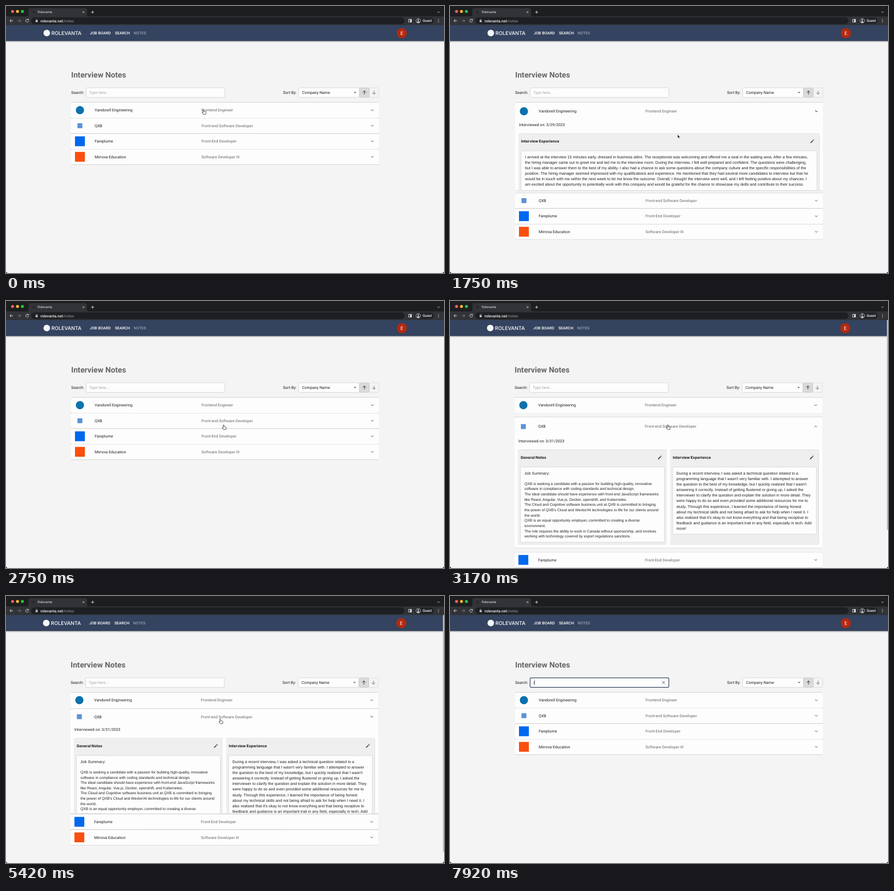
Animation, 800 px wide and 489 px high, one loop 8 s. Source, as an HTML page:

```html
<!DOCTYPE html>
<html lang="en">
<head>
<meta charset="utf-8">
<title>Interview Notes</title>
<style>
  html, body { margin: 0; width: 100%; height: 100%; overflow: hidden; background: #000; }
  #stage { display: block; width: 100vw; height: 100vh; }
  text { font-family: Roboto, sans-serif; white-space: pre; text-rendering: geometricPrecision; }
  .body { font-family: "Liberation Sans", Arial, sans-serif; }
  .title { font-family: Inter, sans-serif; font-weight: 700; }
  .brand { font-family: Inter, sans-serif; }
  .nav { filter: drop-shadow(0 1px 1.3px #0007); }
  .paper { filter: drop-shadow(0 .8px .4px #0009); }
  .card { filter: drop-shadow(0 .6px .5px #0006); }
  .box { filter: drop-shadow(0 .5px .8px #0003); }
  .line { fill: none; stroke-width: .9; }
</style>
</head>
<body>
<svg id="stage" viewBox="0 0 800 489" preserveAspectRatio="none"></svg>
<script>
const LOOP = 8000;
const BASE = 7.14;
const ROW = 28.5, LIST_TOP = 176.5;
const PAGE_TOP = 35;
const INK = '#1f1f1f', GREY = '#666', NAVY = '#34435f';

// Text is placed by the vertical middle of its capitals.
const text = (x, mid, str, { size = BASE, fill = INK, weight = 400, cls = '', anchor = 'start' } = {}) =>
  `<text x="${x}" y="${mid + size * .356}" font-size="${size}" fill="${fill}" font-weight="${weight}" class="${cls}" text-anchor="${anchor}">${str}</text>`;
const rect = (x, y, w, h, fill, extra = '') =>
  `<rect x="${x}" y="${y}" width="${w}" height="${h}" fill="${fill}" ${extra}/>`;
const circle = (x, y, r, fill, extra = '') => `<circle cx="${x}" cy="${y}" r="${r}" fill="${fill}" ${extra}/>`;
const line = (d, stroke, extra = '') => `<path class="line" d="${d}" stroke="${stroke}" ${extra}/>`;
const square = (side, fill) => rect(135 - side / 2, 14.25 - side / 2, side, side, fill);
const cross = (x, y, r, stroke) =>
  line(`M${x - r} ${y - r}l${2 * r} ${2 * r}m0 ${-2 * r}l${-2 * r} ${2 * r}`, stroke);

const experienceA = `I arrived at the interview 15 minutes early, dressed in business attire. The receptionist was welcoming and offered me a seat in the waiting area. After a few minutes,
the hiring manager came out to greet me and led me to the interview room. During the interview, I felt well-prepared and confident. The questions were challenging,
but I was able to answer them to the best of my ability. I also had a chance to ask some questions about the company culture and the specific responsibilities of the
position. The hiring manager seemed impressed with my qualifications and experience. He mentioned that they had several more candidates to interview but that he
would be in touch with me within the next week to let me know the outcome. Overall, I thought the interview went well, and I left feeling positive about my chances. I
am excited about the opportunity to potentially work with this company and would be grateful for the chance to showcase my skills and contribute to their success.`;

const notesB = `QXB is seeking a candidate with a passion for building high-quality, innovative
software in compliance with coding standards and technical design.
The ideal candidate should have experience with front-end JavaScript frameworks
like React, Angular, Vue.js, Docker, openshift, and Kubernetes.
The Cloud and Cognitive software business unit at QXB is committed to bringing
the power of QXB's Cloud and Wexlor/AI technologies to life for our clients around
the world.
QXB is an equal opportunity employer, committed to creating a diverse
environment.
The role requires the ability to work in Canada without sponsorship, and involves
working with technology covered by export regulations sanctions.`;

const experienceB = `During a recent interview, I was asked a technical question related to a
programming language that I wasn't very familiar with. I attempted to answer
the question to the best of my knowledge, but I quickly realized that I wasn't
answering it correctly. Instead of getting flustered or giving up, I asked the
interviewer to clarify the question and explain the solution in more detail. They
were happy to do so and even provided some additional resources for me to
study. Through this experience, I learned the importance of being honest
about my technical skills and not being afraid to ask for help when I need it. I
also realized that it's okay to not know everything and that being receptive to
feedback and guidance is an important trait in any field, especially in tech. Add
more!`;

const paragraph = (x, mid, str, size, pitch) => str.split('\n')
  .map((s, i) => text(x, mid + i * pitch, s, { size, cls: 'body' })).join('');

function card(x, width, bottom, boxBottom, title, content) {
  const pencil = `<path transform="translate(${x + width - 13} 39)" fill="#555" d="M-3.2 3.2v-1.4l4-4 1.4 1.4-4 4zM1.3-2.7l.8-.8q.4-.3.8 0l.6.6q.3.4 0 .8l-.8.8z"/>`;
  return rect(x, 24.8, width, bottom - 24.8, '#efefef', 'rx="2" class="card"') +
    text(x + 5, 38.8, title, { size: 6.75, cls: 'title', fill: '#111' }) + pencil +
    rect(x + 5.2, 56.8, width - 10, boxBottom - 56.8, '#fdfdfd', 'rx="1.8" class="box"') + content;
}

const rows = [
  { company: 'Vandorell Engineering', role: 'Frontend Engineer', logo: circle(135, 14.25, 7.5, '#0c71ad'),
    open: 422, close: 1701, duration: 315, height: 140, date: '3/29/2023',
    content: card(125, 549.5, 132.9, 128.5, 'Interview Experience', paragraph(137, 67.3, experienceA, BASE, 10.15)) },
  { company: 'QXB', role: 'Front-end Software Developer', logo: square(9, '#5a92d4'),
    open: 2800, close: 5338, duration: 349, height: 205, date: '3/31/2023',
    content: card(125, 272, 198, 193.3, 'General Notes',
        text(137, 67.3, 'Job Summary:', { cls: 'body' }) + paragraph(137, 86.7, notesB, 6.75, 9.63)) +
      card(403, 271.5, 198, 178.8, 'Interview Experience', paragraph(414.5, 67.3, experienceB, BASE, 10.15)) },
  { company: 'Fareplume', role: 'Front-End Developer', logo: square(18, '#0068ef') },
  { company: 'Mirrova Education', role: 'Software Developer III', logo: square(18, '#fa4f0f') },
];

const rowMarkup = (r, i) => `<g class="row">
  ${rect(119, 0, 562, ROW, '#fdfdfd', 'class="paper" rx="1.5"')}
  ${i ? rect(119, 0, 562, .6, '#d9d9d9') : ''}
  <svg class="content" width="800" height="0" overflow="hidden">
    ${r.content ? text(126, 8.8, 'Interviewed on: ' + r.date) + r.content : ''}</svg>
  <g class="head">${r.logo}${text(162, 14.2, r.company)}${text(357, 14.2, r.role, { fill: GREY })}
    <path class="line chevron" d="M-2.3-1.2L0 1.2 2.3-1.2" stroke="#444"/></g></g>`;

const chrome =
  rect(0, 0, 800, PAGE_TOP, '#1d1e20', 'rx="4"') +
  `<path fill="#323337" d="M0 ${PAGE_TOP}V19H38q3 0 3-3V7q0-3 3-3H145q3 0 3 3v9q0 3 3 3H800V${PAGE_TOP}z"/>` +
  circle(12, 10, 2.7, '#ff5f57') + circle(21, 10, 2.7, '#febc2e') + circle(30, 10, 2.7, '#28c840') +
  circle(50.5, 11.3, 2.4, '#26272b') + text(58, 11.3, 'Rolevanta', { size: 6, fill: '#e4e5e8' }) +
  cross(141.5, 11.3, 1.6, '#d5d6d9') + line('M155.5 11.3h5.4m-2.7-2.7v5.4', '#e4e5e8') +
  line('M788 10.3l2 2 2-2', '#d5d6d9') +
  rect(46, 20.8, 682, 12.4, '#1e1f22', 'rx="6.2"') +
  line('M12.8 27H7m2.6-2.6L7 27l2.6 2.6', '#e4e5e8') +
  line('M21.3 27h5.8m-2.6-2.6l2.6 2.6-2.6 2.6', '#85868a') +
  line('M41 25.4a2.7 2.7 0 1 0 .3 2.2M41.2 23.8v2h-2', '#e4e5e8') +
  rect(54, 26.2, 4, 3.4, '#c9cacd', 'rx=".5"') + line('M54.9 26.3v-1a1.1 1.1 0 0 1 2.2 0v1', '#c9cacd', 'style="stroke-width:.7"') +
  `<text x="63" y="29.5" font-size="7" font-weight="500" fill="#f1f2f4">rolevanta.net<tspan fill="#999b9f" font-weight="400">/notes</tspan></text>` +
  rect(735.6, 24.4, 5, 5, 'none', 'stroke="#e4e5e8" stroke-width=".9"') + rect(738.2, 24.4, 2.6, 5, '#e4e5e8') +
  rect(746.5, 21, 35, 12, '#222327', 'rx="6"') +
  circle(753, 27, 4.2, 'none', 'stroke="#e4e5e8" stroke-width=".8"') +
  circle(753, 25.8, 1.3, '#e4e5e8') + `<path fill="#e4e5e8" d="M750.2 29.3q2.8-2.4 5.6 0-2.8 2.6-5.6 0z"/>` +
  text(761, 27.1, 'Guest', { size: 6.4, fill: '#f1f2f4', weight: 500 }) +
  [24.6, 27, 29.4].map(y => circle(790, y, .65, '#e4e5e8')).join('');

const navbar = rect(0, PAGE_TOP, 800, 29, NAVY, 'class="nav"');

const navItems =
  circle(74.5, 49.6, 6, '#f4f5f7') +
  text(83, 49.7, 'ROLEVANTA', { size: 9.2, fill: '#fff', weight: 500, cls: 'brand' }) +
  text(153, 49.7, 'JOB BOARD', { fill: '#fff', weight: 500 }) +
  text(199, 49.7, 'SEARCH', { fill: '#fff', weight: 500 }) +
  text(233.3, 49.7, 'NOTES', { fill: '#b3b9c5' }) +
  circle(723, 49.7, 9.2, '#b5290f') + text(723, 49.8, 'E', { size: 8.9, fill: '#fff', anchor: 'middle' });

const toolbar =
  text(119, 126.4, 'Interview Notes', { size: 14.2, fill: '#666', weight: 700 }) +
  text(119, 158.6, 'Search:') +
  rect(146.3, 149.8, 253.4, 17.6, '#fdfdfd', 'id="field" rx="1.8"') +
  `<g id="hint">${text(152, 158.6, 'Type here...', { fill: '#a6a6a6' })}</g>` +
  `<g id="typed">${text(152.3, 158.6, 'i')}${cross(390, 158.5, 2.6, '#444')}</g>` +
  rect(0, 154.4, .6, 8.4, '#111', 'id="caret"') +
  text(506, 158.6, 'Sort By:') +
  rect(534.5, 149.8, 111, 17.6, '#fdfdfd', 'rx="1.8" stroke="#c2c2c2" stroke-width=".6"') +
  text(540.8, 158.6, 'Company Name') + `<path fill="#555" d="M635.3 157.4h4.6l-2.3 2.4z"/>` +
  rect(663.5, 149.8, 17.4, 17.6, '#f4f4f4', 'rx="1.8" stroke="#cfcfcf" stroke-width=".6"') +
  rect(645.8, 149.8, 17.7, 17.6, '#dadada', 'rx="1.8" stroke="#c2c2c2" stroke-width=".6"') +
  line('M654.7 162v-6.6m-3.1 3.1l3.1-3.1 3.1 3.1', '#222') +
  line('M672.2 155.2v6.6m-3.1-3.1l3.1 3.1 3.1-3.1', '#666');

const cursors = {
  hand: '<path fill="#fff" stroke="#111" stroke-width=".7" stroke-linejoin="round" d="M-.9.3q.8-1.1 1.6 0l.2 2.7 2.8.6q1.3.4 1.1 1.8l-.7 3h-4.1l-2.2-2.7q-.6-1.2.6-1l.9.7z"/>',
  arrow: '<path fill="#111" stroke="#fff" stroke-width=".5" d="M0 0v6.3l1.4-1.3 1 2.2 1.1-.5-1-2.1h2z"/>',
  beam: line('M-1.3-3.7q1.3 0 1.3 1v5.4q0 1-1.3 1M1.3-3.7q-1.3 0-1.3 1v5.4q0 1 1.3 1', '#222', 'style="stroke-width:.7"'),
};

const stage = document.getElementById('stage');
stage.innerHTML = rect(0, 30, 800, 459, '#f4f4f4', 'rx="4"') + navbar +
  `<g id="page">${navItems}${toolbar}${rows.map(rowMarkup).join('')}</g>` +
  `<g id="scroll">${rect(798, PAGE_TOP, 2, 450, '#fafafa')}${rect(798, PAGE_TOP, 2, 0, '#bdbdbd', 'id="thumb" rx="1"')}</g>` + chrome +
  `<g id="mouse">${Object.entries(cursors).map(([k, v]) => `<g id="${k}">${v}</g>`).join('')}</g>`;

const $ = id => document.getElementById(id);
const show = (id, on) => $(id).setAttribute('visibility', on ? 'visible' : 'hidden');
const move = (el, x, y, turn = 0) => el.setAttribute('transform', `translate(${x} ${y}) rotate(${turn})`);
const rowParts = [...stage.querySelectorAll('.row')].map(g => ({
  g, paper: g.querySelector('.paper'), head: g.querySelector('.head'),
  content: g.querySelector('.content'), chevron: g.querySelector('.chevron'),
}));

// cubic-bezier(.4, 0, .2, 1), solved by bisection
function ease(x) {
  if (x <= 0) return 0;
  if (x >= 1) return 1;
  let lo = 0, hi = 1, s;
  for (let i = 0; i < 24; i++) {
    s = (lo + hi) / 2;
    const at = 1.2 * (1 - s) ** 2 * s + .6 * (1 - s) * s * s + s ** 3;
    if (at < x) lo = s; else hi = s;
  }
  return s * s * (3 - 2 * s);
}

const openness = (row, t, duration) => !row.open ? 0 :
  t < row.close ? ease((t - row.open) / duration) : 1 - ease((t - row.close) / duration);

// time, x, y of the pointer's hot spot
const path = [
  [0, 360.5, 190], [1640, 360.5, 190], [1750, 415.8, 235.5], [2000, 417, 239], [2500, 397.5, 227],
  [3900, 397.5, 227], [3920, 391.5, 225.5], [5750, 391.5, 225.5], [6900, 230, 158.5], [LOOP, 230, 158.5],
];
function pointer(t) {
  const i = path.findIndex(p => p[0] > t);
  const [t0, x0, y0] = path[i - 1], [t1, x1, y1] = path[i];
  const k = (t - t0) / (t1 - t0), s = k * k * (3 - 2 * k);
  return [x0 + (x1 - x0) * s, y0 + (y1 - y0) * s];
}

const FOCUS = 7150, TYPE = 7830;

function draw(t) {
  let y = LIST_TOP;
  const hot = [];
  rows.forEach((row, i) => {
    const part = rowParts[i];
    const grow = BASE * openness(row, t, 150);
    const body = (row.height || 0) * openness(row, t, row.duration);
    const head = ROW + grow;
    if (i) y += grow;
    move(part.g, 0, y);
    move(part.head, 0, grow / 2);
    move(part.chevron, 669, 14.25, 180 * openness(row, t, 100));
    part.paper.setAttribute('height', head + body);
    part.content.setAttribute('y', head);
    part.content.setAttribute('height', body);
    hot.push([y, y + head]);
    y += head + body + grow;
  });

  const pageEnd = y + 54, viewHeight = 489 - PAGE_TOP, scrolls = pageEnd > 489;
  move($('page'), scrolls ? -1 : 0, 0);
  show('scroll', scrolls);
  $('thumb').setAttribute('height', viewHeight ** 2 / (pageEnd - PAGE_TOP));

  const focused = t >= FOCUS, typed = t >= TYPE;
  $('field').setAttribute('stroke', focused ? NAVY : '#c2c2c2');
  $('field').setAttribute('stroke-width', focused ? 1.2 : .6);
  show('hint', !typed);
  show('typed', typed);
  show('caret', typed || focused && (t - FOCUS) % 1000 < 500);
  $('caret').setAttribute('x', typed ? 154.4 : 152);

  const [mx, my] = pointer(t);
  const overRow = hot.some(([a, b]) => my >= a && my < b);
  const kind = my > 150 && my < 168 && mx < 400 ? 'beam' : overRow ? 'hand' : 'arrow';
  move($('mouse'), mx, my);
  for (const k in cursors) show(k, k === kind && !typed);
}

const start = performance.now();
(function tick() {
  draw((performance.now() - start) % LOOP);
  requestAnimationFrame(tick);
})();
</script>
</body>
</html>
```
